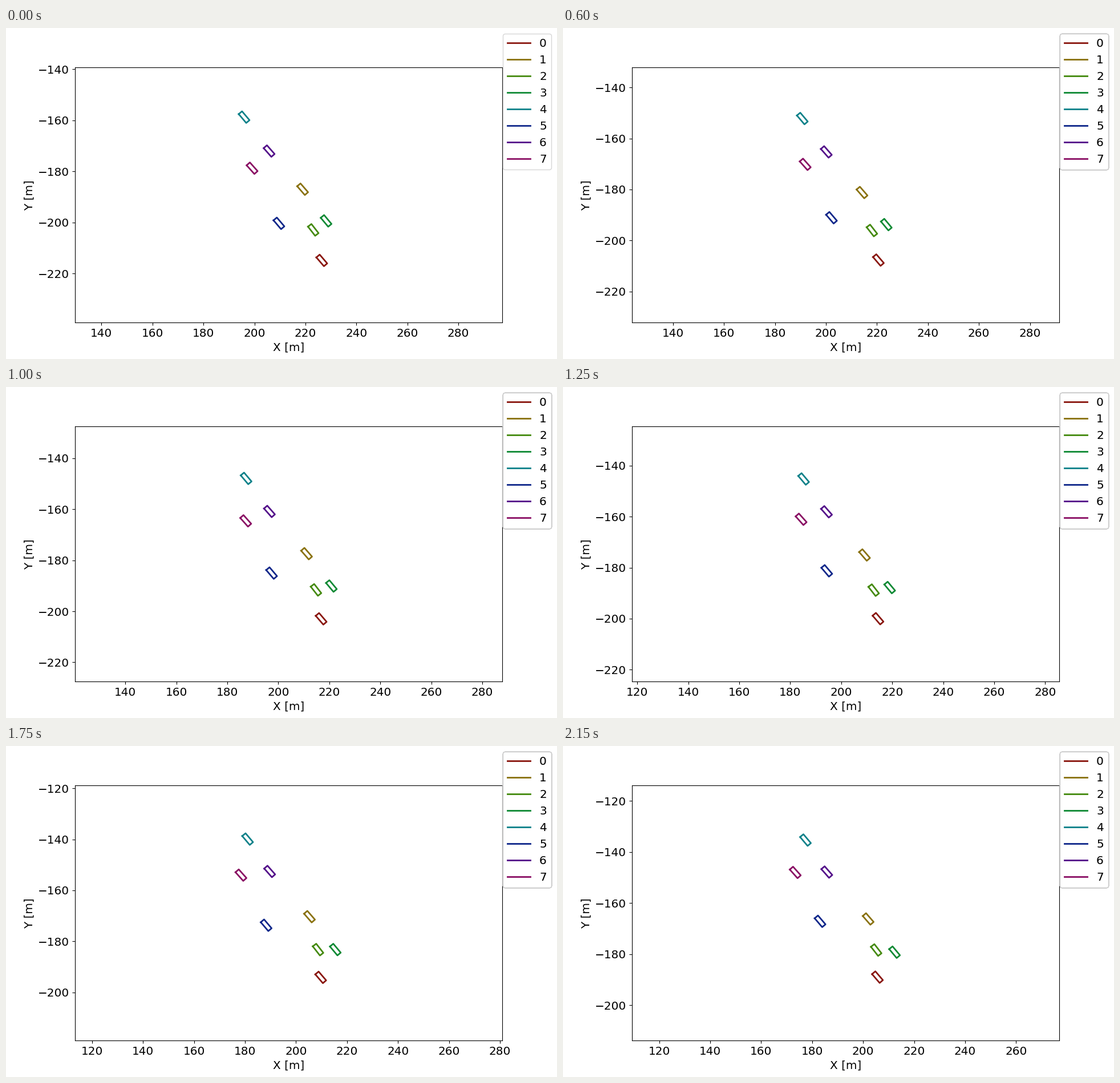
Recreate the animation shown at these times as a matplotlib script. Size 966 by 580 pixels, loop 2.2 s.

```python
import colorsys

import numpy as np
import matplotlib.pyplot as plt
from matplotlib.animation import FuncAnimation
from matplotlib.ticker import MultipleLocator

FRAMES, STEP = 44, 50
LENGTH, WIDTH = 4.55, 1.7          # vehicle size in metres
SLIP = 1.8                         # degrees between course and body
HALF_Y = 50.0

# Each vehicle drives straight: start x, start y, distance, course
VEHICLES = [
    (226.42, -214.90, 33.2, 51.2),
    (218.91, -187.00, 26.8, 50.8),
    (223.08, -202.94, 30.4, 53.8),
    (228.12, -199.40, 25.6, 51.9),
    (195.96, -158.74, 29.9, 51.6),
    (209.62, -200.37, 42.5, 51.4),
    (205.77, -172.04, 31.4, 50.4),
    (199.10, -178.76, 40.1, 50.1),
]


def progress(t):
    """Share of the distance covered; the pace is slightly uneven."""
    return np.interp(t, [0, 0.35, 0.6, 1.75, 2.15], [0, 0.151, 0.28, 0.804, 1])


def heading(degrees):
    a = np.radians(180 - degrees)
    return np.array([np.cos(a), np.sin(a)])


def outline(center, tilt):
    along = heading(tilt) * LENGTH / 2
    across = heading(tilt - 90) * WIDTH / 2
    signs = [(1, 1), (1, -1), (-1, -1), (-1, 1), (1, 1)]
    return np.array([center + a * along + b * across for a, b in signs])


plt.rcParams["font.family"] = "DejaVu Sans"
plt.rcParams["font.size"] = 14.4

fig, ax = plt.subplots(figsize=(9.66, 5.8), dpi=100)
fig.subplots_adjust(left=0.125, right=0.9005, bottom=0.11, top=0.8808)
box = ax.get_window_extent()
HALF_X = HALF_Y * box.width / box.height

ax.set_xlabel("X [m]")
ax.set_ylabel("Y [m]")
for axis in (ax.xaxis, ax.yaxis):
    axis.set_major_locator(MultipleLocator(20))

lines = []
for n in range(len(VEHICLES)):
    color = colorsys.hls_to_rgb(0.01 + n / 8, 0.3, 0.8)
    lines += ax.plot([], [], color=color, lw=2, label=str(n))

# Translucent legends pile up over time, so their edges get stronger
legends = [fig.legend(handles=lines, loc="upper right") for _ in range(12)]


def update(i):
    p = progress(i * STEP / 1000)
    centers = np.array([np.array([x, y]) + p * dist * heading(course)
                        for x, y, dist, course in VEHICLES])
    for line, center, car in zip(lines, centers, VEHICLES):
        line.set_data(*outline(center, car[3] - SLIP).T)

    mx, my = centers.mean(axis=0)
    ax.set_xlim(mx - HALF_X, mx + HALF_X)
    ax.set_ylim(my - HALF_Y, my + HALF_Y)
    for k, legend in enumerate(legends):
        legend.set_visible(k <= i)
    return lines


anim = FuncAnimation(fig, update, frames=FRAMES, interval=STEP,
                     repeat=True, repeat_delay=0, blit=False)
plt.show()
```
